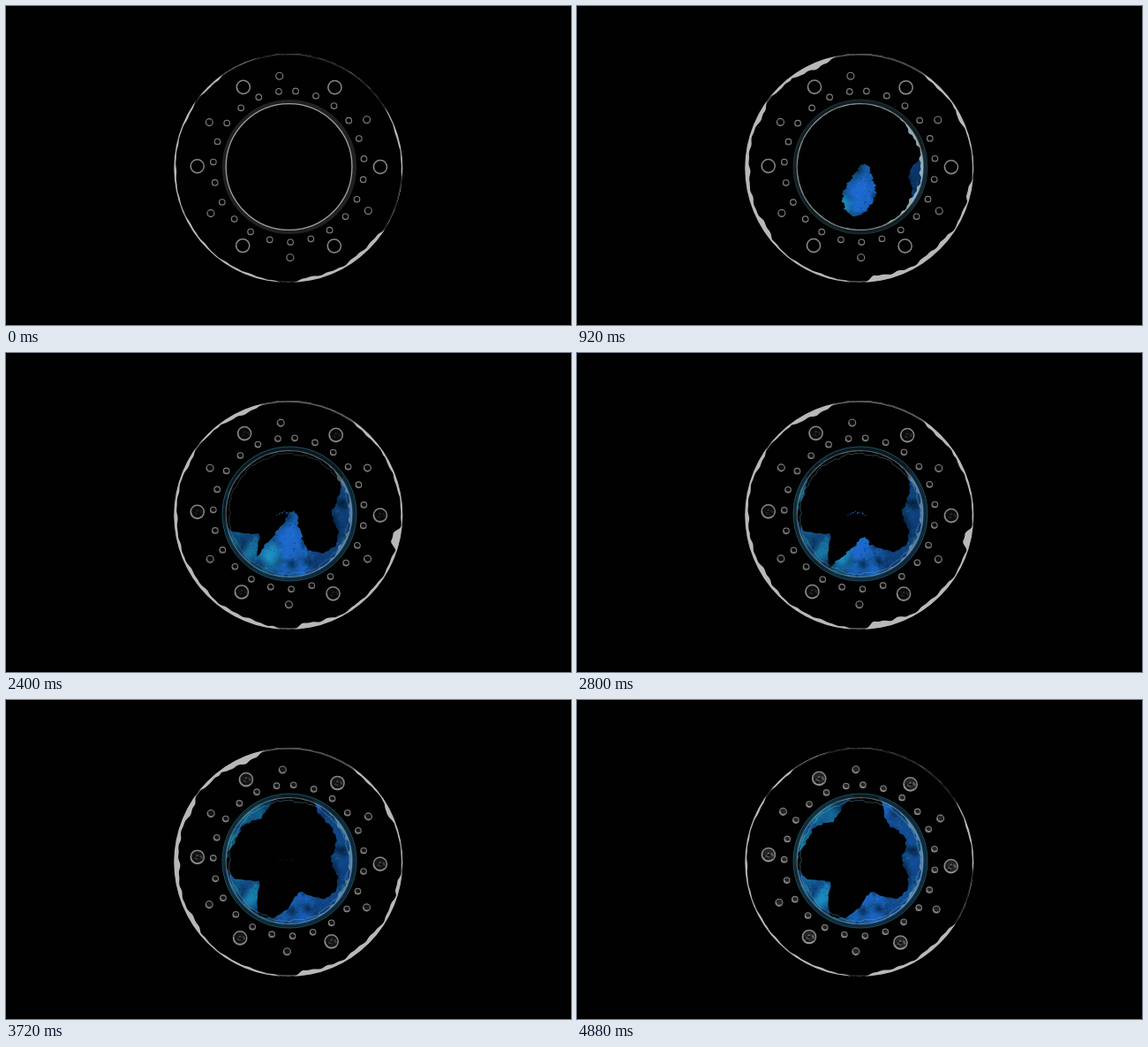
Write an HTML page with a canvas that moves like this. It is 640x361 px and loops after 4.92 s.

```html
<!DOCTYPE html>
<html lang="en">
<head>
<meta charset="utf-8">
<title>Porthole</title>
<style>
html, body { margin: 0; width: 100%; height: 100%; overflow: hidden; background: #010101; }
canvas { display: block; width: 640px; height: 361px; }
</style>
</head>
<body>
<canvas id="stage" width="640" height="361"></canvas>
<script>
const ctx = document.getElementById('stage').getContext('2d');
const LOOP = 4920, LAST = 4880, TAU = Math.PI * 2, RAD = Math.PI / 180;
const lerp = (a, b, k) => a + (b - a) * k;
const clamp = v => Math.max(0, Math.min(1, v));
const smooth = v => (v = clamp(v)) * v * (3 - 2 * v);
const ease = (t, from, to) => smooth((t - from) / (to - from));
const apart = (a, b) => Math.abs((a - b + 900) % 360 - 180);

function hash(n) {
  const s = Math.sin(n * 127.1 + 11.7) * 43758.5453;
  return s - Math.floor(s);
}

// Uneven wave around a circle, about -1 to 1
function ragged(deg, seed) {
  const a = deg * RAD;
  return .45 * Math.sin(11 * a + seed) + .35 * Math.sin(26 * a + seed * 3) + .25 * Math.sin(53 * a + seed * 5);
}

// Frost on the rim: angle, half width, full depth, resting depth
const FROST = [
  [58, 24, 5, 4], [75, 10, 7, 3], [120, 24, 4, 2.2], [157, 16, 6, 2],
  [190, 24, 6, 2.2], [227, 6, 6, 3.5], [245, 11, 8, .5], [318, 12, 4, .3],
  [334, 5, 6, 1.5], [350, 14, 2.5, 2], [12, 5, 8, .5], [30, 12, 5, .5]
];

// Water growing inwards: angle, width, depth, start and end time
const WATER = [
  [140, 20, 40, 1300, 2400], [72, 28, 41, 1500, 2600], [12, 24, 25, 300, 900], [348, 22, 19, 1300, 2600],
  [312, 22, 33, 1700, 4800], [238, 29, 32, 1650, 4300], [192, 26, 18, 1700, 2800]
];

function makeWater() {
  const c = document.createElement('canvas');
  c.width = c.height = 160;
  const g = c.getContext('2d');
  g.fillStyle = '#114f8c';
  g.fillRect(0, 0, 160, 160);
  for (let i = 0; i < 260; i++) {
    const x = hash(i) * 160, y = hash(i + 300) * 160, r = 3 + hash(i + 600) * 13;
    const low = y > 95;
    const rgb = hash(i + 900) < .36 ? '4,28,58'
      : x < 62 ? (low ? '30,150,200' : '20,122,152')
      : x > 112 ? '18,76,150' : '30,108,215';
    const glow = g.createRadialGradient(x, y, 0, x, y, r);
    glow.addColorStop(0, `rgba(${rgb},.65)`);
    glow.addColorStop(1, `rgba(${rgb},0)`);
    g.fillStyle = glow;
    g.fillRect(x - r, y - r, 2 * r, 2 * r);
  }
  for (let i = 0; i < 900; i++) {
    g.fillStyle = i % 2 ? 'rgba(85,190,230,.25)' : 'rgba(0,12,36,.35)';
    g.fillRect(hash(i + 2000) * 160, hash(i + 4000) * 160, 1.5, 1);
  }
  return c;
}
const water = ctx.createPattern(makeWater(), 'repeat');
water.setTransform(new DOMMatrix([1, 0, 0, 1, 241, 102]));

function circle(x, y, r) {
  ctx.beginPath();
  ctx.arc(x, y, r, 0, TAU);
}

function ring(x, y, r, width, color) {
  circle(x, y, r);
  ctx.lineWidth = width;
  ctx.strokeStyle = color;
  ctx.stroke();
}

// Closed outline whose radius depends on the angle
function trace(x, y, radius) {
  for (let d = 0; d < 360; d++) {
    const r = radius(d), a = d * RAD;
    ctx[d ? 'lineTo' : 'moveTo'](x + r * Math.cos(a), y + r * Math.sin(a));
  }
  ctx.closePath();
}

function band(x, y, outer, inner) {
  circle(x, y, outer);
  trace(x, y, inner);
  ctx.fill('evenodd');
}

function drawRim(u) {
  const swell = Math.sqrt(Math.sin(Math.PI * u));
  const depth = d => {
    let most = .3;
    FROST.forEach(([a, w, full, rest], i) => {
      const pulse = .8 + .25 * Math.sin(TAU * (2 * u + hash(i + 7)));
      const edge = smooth((w + 3 - apart(d, a)) / 6);
      most = Math.max(most, edge * lerp(rest, full * pulse, swell));
    });
    return most * (.85 + .4 * ragged(d, 5));
  };
  ctx.save();
  ctx.filter = 'blur(0.7px)';
  ring(319.8, 183.5, 128.6, 1.5, `rgba(150,150,150,${lerp(.2, .6, swell)})`);
  ctx.fillStyle = '#b8b8b8';
  band(319.8, 183.5, 129.5, d => 129.5 - depth(d));
  ctx.restore();
}

function fillWater(alpha) {
  ctx.globalAlpha = alpha;
  ctx.fillStyle = water;
  ctx.fill();
  ctx.lineWidth = 1;
  ctx.strokeStyle = 'rgba(40,130,190,.35)';
  ctx.stroke();
  ctx.globalAlpha = 1;
}

// Drop that appears in the middle, spreads downwards and drains away
function drawSplash(t) {
  const grow = ease(t, 150, 900), spread = ease(t, 920, 1900), drain = ease(t, 2400, 3300);
  if (!grow || drain === 1) return;
  const top = lerp(lerp(212, 179, grow), 250, drain);
  const bottom = lerp(lerp(214, 238, grow), 282, spread);
  const base = lerp(20, 34, spread) * grow;
  const edge = (s, side) => {
    const half = Math.sqrt(Math.sin(Math.PI * Math.pow(s, .85))) * lerp(9 * grow, base, smooth(s * 1.4));
    const x = 326 - lerp(11, 26, spread) * s + side * half;
    ctx.lineTo(x + 2.2 * ragged(s * 200, side + 4), lerp(top, bottom, s));
  };
  ctx.beginPath();
  for (let i = 0; i <= 50; i++) edge(i / 50, 1);
  for (let i = 50; i >= 0; i--) edge(i / 50, -1);
  ctx.closePath();
  fillWater(1);
}

function drawSpray(t) {
  const alpha = ease(t, 1200, 1700) * (1 - ease(t, 3200, 3900));
  ctx.fillStyle = `rgba(28,88,165,${alpha * .8})`;
  for (let i = 0; i < 8; i++) {
    circle(307 + i * 2.8, 182 - 3 * Math.sin(i / 7 * Math.PI) + hash(i) * 2, .6 + hash(i + 20) * .7);
    ctx.fill();
  }
}

function drawWindow(t, u) {
  ctx.save();
  circle(321, 182, 75);
  ctx.clip();
  ctx.beginPath();
  ctx.rect(230, 90, 180, 180);
  trace(319, 178, d => {
    let r = 84;
    for (const [a, w, depth, from, to] of WATER) {
      r -= depth * ease(t, from, to) * Math.exp(-((apart(d, a) / w) ** 2));
    }
    return r + 2.2 * ragged(d, 3 + u);
  });
  ctx.save();
  ctx.clip('evenodd');
  circle(321, 182, 76);
  fillWater(lerp(.65, 1, u));
  ctx.restore();
  drawSplash(t);
  drawSpray(t);
  ctx.restore();

  const tint = ease(t, 200, 1600);
  ring(321, 182, 73.8, 4.6, `rgba(${lerp(44, 14, tint)},${lerp(44, 34, tint)},${lerp(44, 42, tint)},.75)`);
  ring(321, 182, 76, 1, `rgba(40,115,135,${tint * .65})`);

  ctx.save();
  ctx.filter = 'blur(0.4px)';
  ring(320.6, 182, 71.4, 1.3, `rgba(175,185,185,${lerp(.85, .35, tint)})`);
  const frost = lerp(.5, 4, ease(t, 100, 900));
  ctx.fillStyle = `rgba(170,195,205,${lerp(.85, .45, ease(t, 900, 2400))})`;
  band(320.6, 182, 71.5, d =>
    71.5 - frost * (.2 + smooth((65 - apart(d, 5)) / 30)) * (.5 + .5 * ragged(d, 8)));
  ctx.beginPath();
  trace(320.6, 182, d => 68 + 1.6 * ragged(d, 14));
  ctx.lineWidth = .8;
  ctx.strokeStyle = `rgba(130,180,195,${.5 * ease(t, 1400, 3000)})`;
  ctx.stroke();
  ctx.restore();
}

function bubble(deg, dist, r, u) {
  const a = (deg - 90) * RAD, big = r > 6;
  const x = 320.3 + dist * Math.cos(a), y = 181.7 + dist * Math.sin(a);
  circle(x, y, r);
  ctx.fillStyle = `rgba(90,90,90,${.4 * u * u})`;
  ctx.fill();
  ring(x, y, r, big ? 1.5 : 1.1, big ? '#858585' : '#808080');
  ctx.beginPath();
  ctx.arc(x, y, r - .8, .8, 3.2);
  ctx.lineWidth = 1;
  ctx.strokeStyle = `rgba(195,195,195,${.2 + .5 * u})`;
  ctx.stroke();
  if (!big) return;
  for (let i = 0; i < 12; i++) {
    const q = hash(i + dist) * TAU, m = hash(i + 40) * (r - 2);
    ctx.fillStyle = i % 2 ? `rgba(0,0,0,${.6 * u * u})` : `rgba(165,165,165,${.4 * u * u})`;
    circle(x + m * Math.cos(q), y + m * Math.sin(q), 1.3);
    ctx.fill();
  }
}

function drawBubbles(u) {
  const turn = 3.4 * u * u, back = -2.8 * u * u;
  for (let i = 0; i < 6; i++) {
    bubble(30.2 + i * 60 + turn, 103.6, 7.6, u);
    bubble(-0.9 + i * 60 + turn + (i ? 0 : -5), 103, 4, u);
  }
  for (let i = 0; i < 23; i++) bubble(5.2 + i * 15.78 + back, 85.6, 3.3, u);
}

function draw(ms) {
  let t = Math.floor(ms % LOOP / 40) * 40;
  if (t < 80) t = 0;
  const u = clamp(t / LAST);
  ctx.fillStyle = '#010101';
  ctx.fillRect(0, 0, 640, 361);
  drawRim(u);
  drawWindow(t, u);
  drawBubbles(u);
}

const start = performance.now();
function tick() {
  draw(performance.now() - start);
  requestAnimationFrame(tick);
}
tick();
</script>
</body>
</html>
```
